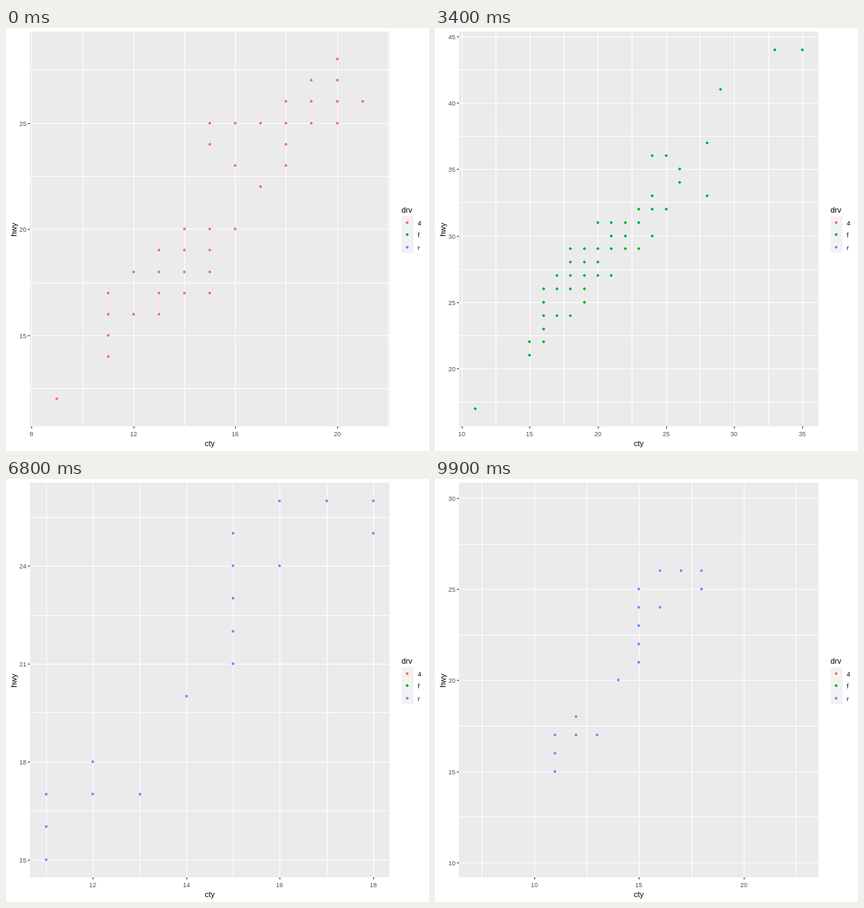
An HTML page for the animation above (10000 ms loop, 600 by 600 pixels).

```html
<!DOCTYPE html>
<html lang="en">
<head>
<meta charset="utf-8">
<title>Zooming scatter plot</title>
<style>
  html, body { margin: 0; width: 100%; height: 100%; overflow: hidden; background: #fff; }
  svg { display: block; width: 600px; height: 600px; font-family: "Liberation Sans", Arial, sans-serif; }
  .axis { font-size: 9px; fill: #4d4d4d; }
  .key { font-size: 9px; }
  .title { font-size: 11px; }
  rect, path { shape-rendering: crispEdges; }
</style>
</head>
<body>
<svg viewBox="0 0 600 600">
  <defs><clipPath id="panel"><rect x="34" y="5" width="510" height="560"/></clipPath></defs>
  <rect x="34" y="5" width="510" height="560" fill="#ebebeb"/>
  <g id="plot"></g>
  <text class="title" x="289" y="593" text-anchor="middle">cty</text>
  <text class="title" transform="translate(15 286) rotate(-90)" text-anchor="middle">hwy</text>
  <g id="legend"></g>
</svg>
<script>
const FRAME = 100, FRAMES = 100, RHO2 = 162;
const LEFT = 34, TOP = 5, WIDTH = 510, HEIGHT = 560;
// Exact panel origin before snapping to whole pixels.
const X0 = 33.98, Y0 = 5.14;

// Each group lists "cty:hwy,hwy-hwy" entries.
const groups = [
  { name: '4', color: '#f8766d', data: '9:12 11:14-17 12:16,18 13:16-19 14:17-20 15:17-20,24,25 16:20,23,25 17:22,25 18:23-26 19:25-27 20:25-28 21:26' },
  { name: 'f', color: '#00ba38', data: '11:17 15:21,22 16:22-26 17:24,26,27 18:24,26-29 19:25-29 20:27-29,31 21:27,29-31 22:29-31 23:29,31,32 24:30,32,33,36 25:32,36 26:34,35 28:33,37 29:41 33:44 35:44' },
  { name: 'r', color: '#619cff', data: '11:15-17 12:17,18 13:17 14:20 15:21-25 16:24,26 17:26 18:25,26' }
];

function parse(text) {
  const points = [];
  for (const entry of text.split(' ')) {
    const [x, spans] = entry.split(':');
    for (const span of spans.split(',')) {
      const [a, b = a] = span.split('-').map(Number);
      for (let y = a; y <= b; y++) points.push([+x, y]);
    }
  }
  return points;
}

function extent(values) {
  const lo = Math.min(...values), hi = Math.max(...values);
  return { mid: (lo + hi) / 2, size: (hi - lo) * 1.1 };
}

for (const g of groups) {
  g.points = parse(g.data);
  g.view = [0, 1].map(i => extent(g.points.map(p => p[i])));
}

// Zoom out, pan and zoom in along an optimal path on one axis.
function zoom(a, b, p) {
  const dist = b.mid - a.mid, k = RHO2 * Math.abs(dist);
  const diff = b.size ** 2 - a.size ** 2;
  const r0 = -Math.asinh((diff + k * k) / (2 * a.size * k));
  const r1 = -Math.asinh((diff - k * k) / (2 * b.size * k));
  const r = r0 + (r1 - r0) * p;
  const moved = a.size / k * (Math.cosh(r0) * Math.tanh(r) - Math.sinh(r0));
  return { mid: a.mid + dist * moved, size: a.size * Math.cosh(r0) / Math.cosh(r) };
}

// Axis breaks by the extended Wilkinson search.
function findBreaks(lo, hi) {
  const Q = [1, 5, 2, 2.5, 4, 3], m = 5, eps = 1e-10, range = hi - lo;
  const total = (s, c, d) => 0.25 * s + 0.2 * c + 0.5 * d + 0.05;
  let best = { score: -2 };
  for (let j = 1; j < 50; j++) {
    for (let i = 0; i < Q.length; i++) {
      const q = Q[i], simple = 1 - i / (Q.length - 1) - j;
      if (total(simple + 1, 1, 1) < best.score) return best;
      for (let k = 2; k < 50; k++) {
        const dMax = k >= m ? 2 - (k - 1) / (m - 1) : 1;
        if (total(simple + 1, 1, dMax) < best.score) break;
        let z = Math.ceil(Math.log10(range / (k + 1) / j / q));
        for (; z < 20; z++) {
          const step = j * q * 10 ** z, span = step * (k - 1);
          const cMax = span > range ? 1 - ((span - range) / 2) ** 2 / (0.1 * range) ** 2 : 1;
          if (total(simple + 1, cMax, dMax) < best.score) break;
          const first = Math.floor(hi / step) * j - (k - 1) * j;
          const last = Math.ceil(lo / step) * j;
          for (let s = first; s <= last; s++) {
            const min = s * step / j, max = min + span;
            const rest = min - Math.floor(min / step) * step;
            const zero = (rest < eps || step - rest < eps) && min <= 0 && max >= 0 ? 1 : 0;
            const cover = 1 - 0.5 * ((hi - max) ** 2 + (lo - min) ** 2) / (0.1 * range) ** 2;
            const ratio = (k - 1) / span / ((m - 1) / (Math.max(max, hi) - Math.min(min, lo)));
            const score = total(simple + zero, cover, 2 - Math.max(ratio, 1 / ratio));
            if (score > best.score) best = { score, min, step, count: k };
          }
        }
      }
    }
  }
  return best;
}

function axisTicks({ mid, size }) {
  const lo = mid - size / 2, hi = mid + size / 2;
  const { min, step, count } = findBreaks(lo, hi);
  const inside = v => v >= lo - 1e-9 && v <= hi + 1e-9;
  const major = [], minor = [];
  for (let i = 0; i <= count; i++) {
    if (i < count) major.push(min + i * step);
    minor.push(min + (i - 0.5) * step);
  }
  let digits = 0;
  while (digits < 4 && major.some(v => Math.abs(v - +v.toFixed(digits)) > 1e-8)) digits++;
  return {
    minor: minor.filter(inside),
    major: major.filter(inside).map(v => ({ v, label: (+v.toFixed(digits) || 0).toFixed(digits) }))
  };
}

const box = (x, y, w, h, fill) => `<rect x="${x}" y="${y}" width="${w}" height="${h}" fill="${fill}"/>`;
const label = (cls, x, y, text, anchor = 'start') =>
  `<text class="${cls}" x="${x}" y="${y}" text-anchor="${anchor}">${text}</text>`;
const dot = (x, y) => `M${x - 1} ${y - 2}h2v1h1v2h-1v1h-2v-1h-1v-2h1z`;

function sceneAt(frame) {
  // Pauses end and moves begin at fixed frames; frame 0 closes the last move.
  const f = frame === 0 ? FRAMES : frame;
  const starts = [22, 56, 89];
  const move = starts.findIndex(s => f > s && f < s + 12);
  const shown = frame < 33 ? 0 : frame < 67 ? 1 : 2;
  if (move < 0) return { shown, view: groups[shown].view };
  const t = (f - starts[move]) / 12;
  const p = (1 - Math.cos(Math.PI * t)) / 2;
  const from = groups[move].view, to = groups[(move + 1) % 3].view;
  return { shown, view: from.map((a, i) => zoom(a, to[i], p)) };
}

function draw(frame) {
  const { shown, view: [vx, vy] } = sceneAt(frame);
  const px = v => Math.round(X0 + ((v - vx.mid) / vx.size + 0.5) * WIDTH);
  const py = v => Math.round(Y0 + (0.5 - (v - vy.mid) / vy.size) * HEIGHT);
  const tx = axisTicks(vx), ty = axisTicks(vy);
  let grid = '', axes = '';
  const vline = v => { grid += box(px(v), TOP, 1, HEIGHT, '#fff'); };
  const hline = v => { grid += box(LEFT, py(v), WIDTH, 1, '#fff'); };
  tx.minor.forEach(vline);
  ty.minor.forEach(hline);
  for (const { v, label: text } of tx.major) {
    vline(v);
    axes += box(px(v), 565, 1, 3, '#333') + label('axis', px(v), 579, text, 'middle');
  }
  for (const { v, label: text } of ty.major) {
    hline(v);
    axes += box(31, py(v), 3, 1, '#333') + label('axis', 29, py(v) + 4, text, 'end');
  }
  const g = groups[shown];
  const dots = g.points.map(([x, y]) => dot(px(x), py(y))).join('');
  document.getElementById('plot').innerHTML =
    `<g clip-path="url(#panel)">${grid}<path d="${dots}" fill="${g.color}" fill-rule="nonzero"/></g>${axes}`;
}

document.getElementById('legend').innerHTML =
  label('title', 561, 262, 'drv') + box(561, 267, 17, 52, '#f2f2f2') +
  groups.map((g, i) => {
    const y = Math.round(276 + i * 17.28);
    return `<path d="${dot(569, y)}" fill="${g.color}"/>` + label('key', 584, y + 4, g.name);
  }).join('');

let current = -1;
const origin = performance.now();
function tick() {
  const frame = Math.floor((performance.now() - origin) / FRAME) % FRAMES;
  if (frame !== current) draw(current = frame);
  requestAnimationFrame(tick);
}
tick();
</script>
</body>
</html>
```
